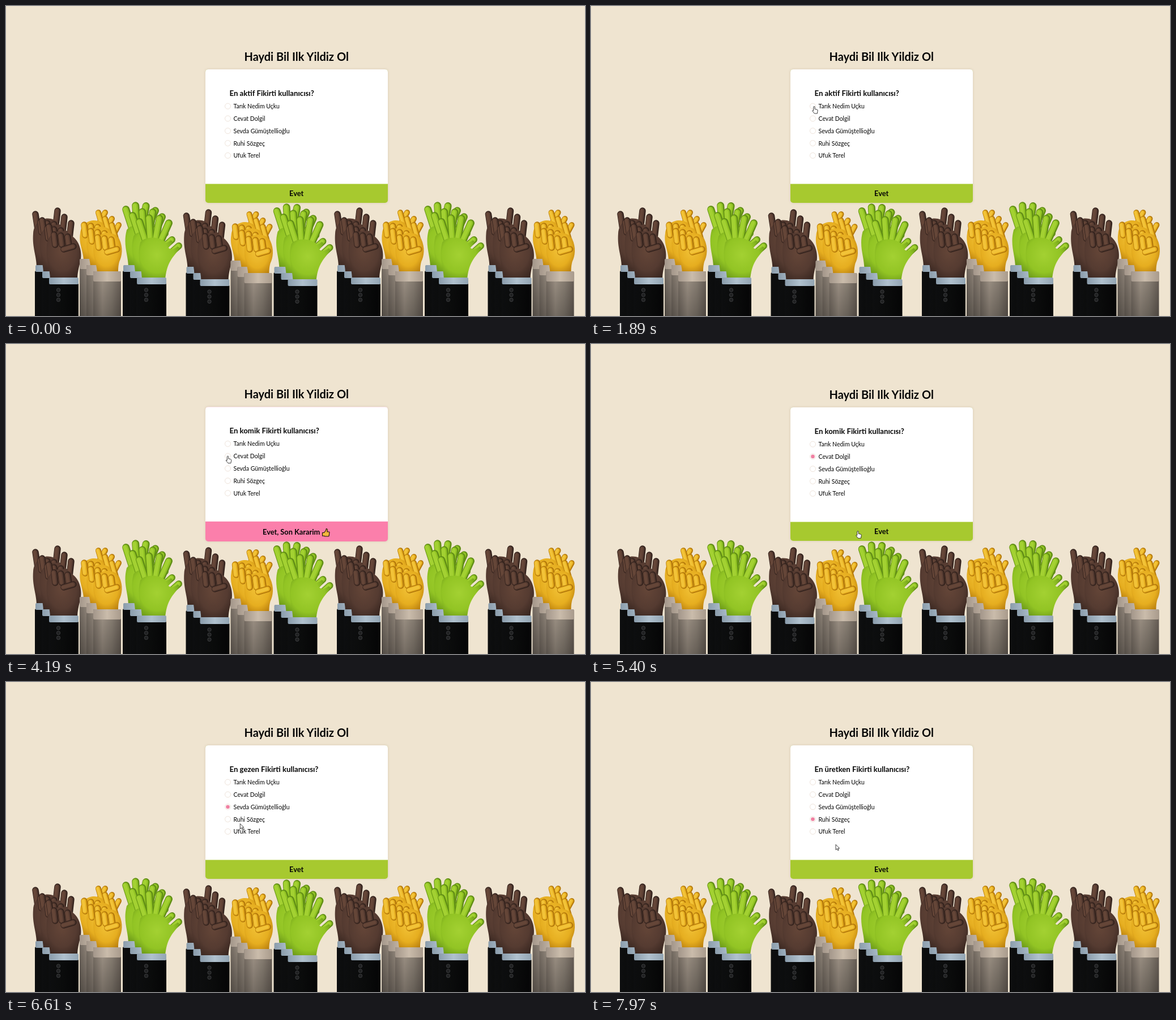
Recreate the animation shown at these times as an HTML page. Size 1022 by 548 pixels, loop 8 s.

```html
<!DOCTYPE html>
<html lang="tr">
<head>
<meta charset="utf-8">
<title>Quiz</title>
<style>
  html, body { margin: 0; width: 100%; height: 100%; overflow: hidden; background: #efe4d0; }
  svg { display: block; width: 100vw; height: 100vh; }
  text { font-family: Lato, "Open Sans", sans-serif; fill: #050505; }
  .title { font-size: 20px; font-weight: 700; text-anchor: middle; }
  .question { font-size: 13.2px; font-weight: 700; }
  .option { font-size: 10.5px; }
  .button { font-size: 12.8px; font-weight: 700; }
  #card { filter: drop-shadow(0 0 2px rgba(90, 70, 40, .16)); }
  .ring { fill: #fff; stroke: #eee3da; }
  .dot { fill: #f080a2; }
</style>
</head>
<body>
<svg viewBox="0 0 1022 548" preserveAspectRatio="none">
  <defs id="defs"></defs>
  <g id="crowd" fill="none"></g>
  <g id="panel">
    <text class="title" x="512.7" y="97">Haydi Bil Ilk Yildiz Ol</text>
    <rect id="card" x="352" y="112" width="322" rx="5"></rect>
    <path fill="#fff" d="M352 314.500V117q0-5 5-5h312q5 0 5 5V314.500z"></path>
    <text id="question" class="question" x="394.5" y="159"></text>
    <g id="options"></g>
  </g>
  <text id="plain" class="button" x="512.7" y="335.5" text-anchor="middle">Evet</text>
  <g id="final">
    <text class="button" x="453" y="336.500">Evet, Son Kararim</text>
    <path d="M558.500 333.500h3l3.200-4 .5-3q2.600 0 2 4l-.4 1.500h3.200q1.600.6.8 2l-.6 5q-.3 1-1.400 1h-6l-1.300-.8h-3z"
          fill="#f4b73d" stroke="#15100a" stroke-width="1.100" stroke-linejoin="round"></path>
  </g>
  <g id="cursor" fill="#fff" stroke="#111" stroke-width=".8" stroke-linejoin="round">
    <path id="arrow" d="M0 0V9.300L2.200 7.300 3.700 10.500 5.200 9.800 3.800 6.700H6.600Z"></path>
    <path id="hand" d="M-1.200 1a1.200 1.200 0 0 1 2.400 0V4.400l3.800.9q1.500.5 1.200 2L5.400 12.300H.4L-3.200 7.700q0-1.700 2-.4z"></path>
  </g>
</svg>
<script>
const LOOP = 8000;
const $ = id => document.getElementById(id);
const times = (n, make) => Array.from({ length: n }, (_, i) => make(i)).join('');

// Each skin: shadow, base, highlight
const skins = {
  brown:  ['#35241e', '#553b31', '#654638'],
  yellow: ['#b3780b', '#e6ae20', '#f2c338'],
  green:  ['#628f16', '#92c424', '#a3d132']
};
const ramp = (id, colors, axis = 'x2="1"') =>
  `<linearGradient id="${id}" x1="0" y1="0" ${axis}>` +
  colors.map((c, i) => `<stop offset="${i / (colors.length - 1)}" stop-color="${c}"/>`).join('') +
  '</linearGradient>';
$('defs').innerHTML =
  Object.entries(skins).map(([name, [dark, base, light]]) =>
    `<radialGradient id="${name}" cx=".45" cy=".4" r=".7">
       <stop offset="0" stop-color="${light}"/><stop offset=".6" stop-color="${base}"/>
       <stop offset="1" stop-color="${dark}"/></radialGradient>`).join('') +
  ramp('suit', ['#0d0e0f', '#0a0b0b', '#050506']) +
  ramp('wool', ['#71685f', '#978c80', '#837a6f', '#645b53']) +
  ramp('cuff', ['#8a9cab', '#b0c1ce', '#93a5b3']) +
  ramp('hem', ['#a3968a', '#cabcab', '#a99b8c']) +
  ramp('dusk', ['#0000', '#0005'], 'x2="0" y2="1"');

const rect = (x, y, w, h, fill) =>
  `<rect x="${x}" y="${y}" width="${w}" height="${h}" rx="2" fill="${fill}"/>`;
const palm = (skin, d) => `<path d="${d}" fill="url(#${skin})"/>`;

// Rounded finger from its tip to its root, lit from the left
const finger = (skin, x1, y1, x2, y2, w = 11.5) => skins[skin].map((color, i) =>
  `<path d="M${x1 - i * w * .07} ${y1}L${x2 - i * w * .07} ${y2}" stroke="${color}"
    stroke-width="${w * (1 - i * .26)}" stroke-linecap="round"/>`).join('');

// Curled fingers side by side, with the thumb across them
const fist = (skin, x, y, n) =>
  times(n, i => finger(skin, x + i * 12, y + 2 * i, x + 2 + i * 12, y + 18)) +
  finger(skin, x + 34, y + 21, x + 17, y + 26);

const suitArm = x =>
  rect(x, 490, 53, 90, 'url(#suit)') + rect(x + 1, 480, 52, 12, 'url(#cuff)') +
  times(3, i => `<circle cx="${x + 17.500}" cy="${502 + i * 8.700}" r="3.200" fill="#202122" stroke="#3b3c3e"/>`);
const woolArm = x =>
  rect(x, 469, 49, 105, 'url(#wool)') + rect(x, 469, 49, 18, 'url(#hem)') + rect(x, 487, 49, 90, 'url(#dusk)');

const brownArm =
  finger('brown', 76, 390, 82, 430) + finger('brown', 115, 384, 110, 428) +
  palm('brown', 'M72 424C74 396 104 390 117 407C130 416 134 434 132 448C128 465 126 471 126 484H78C78 463 70 450 72 424Z') +
  fist('brown', 85, 404, 3) + suitArm(75);

const yellowArm =
  finger('yellow', 199, 387, 182, 418, 10) + finger('yellow', 187, 387, 196, 418, 10) +
  palm('yellow', 'M155 424C157 398 190 394 200 412C207 427 205 442 200 452C198 460 198 464 198 473H161C161 455 152 443 155 424Z') +
  fist('yellow', 162, 409, 3) + woolArm(154);

const greenArm =
  times(4, i => {
    const a = (-18 + 14 * i) * Math.PI / 180, reach = 72 + 4 * Math.sin(i);
    return finger('green', 258 + reach * Math.sin(a), 450 - reach * Math.cos(a),
      258 + 30 * Math.sin(a), 450 - 30 * Math.cos(a), 13);
  }) +
  finger('green', 305, 424, 278, 448, 12) +
  palm('green', 'M237 418C244 407 270 407 281 417C285 431 293 433 303 425Q308 427 303 433C294 445 283 455 281 485H240C240 462 230 445 237 418Z') +
  suitArm(230);

// Every arm stands in a row of three, rear to front
const trio = arm => times(3, i => `<g transform="translate(${12 * (i - 2)} ${11 * (i - 2)})">${arm}</g>`);
const arms = [brownArm, yellowArm, greenArm].map(trio);
$('crowd').innerHTML = times(4, i =>
  `<g transform="translate(${i * 266.500} ${i === 1 ? 3 : 0})">${arms.slice(0, i < 3 ? 3 : 2).join('')}</g>`);

const rowY = i => 177.500 + i * 21.800;
const names = ['Tarık Nedim Uçku', 'Cevat Dolgil', 'Sevda Gümüştellioğlu', 'Ruhi Sözgeç', 'Ufuk Terel'];
$('options').innerHTML = names.map((name, i) =>
  `<circle class="ring" cx="391.500" cy="${rowY(i) - .4}" r="5"/>
   <circle class="dot" cx="391.500" cy="${rowY(i) - .4}" r="3.300"/>
   <text class="option" x="401.500" y="${rowY(i) + 3.700}">${name}</text>`).join('');
const dots = document.querySelectorAll('.dot');

// Round i picks option i, then presses the button, which asks the next question
const rounds = [
  { word: 'aktif', asked: 0, pick: 2550 },
  { word: 'komik', asked: 3580, pick: 4920 },
  { word: 'gezen', asked: 5670, pick: 6540 },
  { word: 'üretken', asked: 7290, pick: 7950 }
];
rounds.forEach((r, i) => r.end = rounds[i + 1]?.asked ?? 8290);

const ENTER = 260;
const moves = [{ from: ENTER, to: 1060, x: 574, y: 270 }];
rounds.forEach((r, i) => {
  const from = i ? r.asked : 1060;
  moves.push({ from, to: i ? from + 620 : 2000, x: 391.500, y: rowY(i) - 1 });
  moves.push({ from: r.pick, to: r.end - 270, x: 471, y: 331 });
});

const easeOut = k => 1 - (1 - k) ** 2;
function pointerAt(t) {
  let x = 859, y = 522;
  for (const m of moves) {
    const k = easeOut(Math.min(1, Math.max(0, (t - m.from) / (m.to - m.from))));
    x += (m.x - x) * k;
    y += (m.y - y) * k;
  }
  return [x, y];
}

const show = (el, on) => el.setAttribute('visibility', on ? 'visible' : 'hidden');

function draw(t) {
  const now = rounds.findLastIndex(r => r.asked <= t);
  const round = rounds[now];
  // The button stays pink from the press until the next option is pressed
  const pink = t >= round.end - 140 || (now > 0 && t < round.pick - 70);
  $('panel').setAttribute('transform', `translate(0 ${pink ? -.7 : 0})`);
  $('card').setAttribute('height', pink ? 237.700 : 236);
  $('card').setAttribute('fill', pink ? '#fb7fab' : '#a7c92f');
  show($('plain'), !pink);
  show($('final'), pink);

  $('question').textContent = `En ${round.word} Fikirti kullanıcısı?`;
  dots.forEach((dot, i) => show(dot, i === now && t >= round.pick));

  const [x, y] = pointerAt(t);
  const onButton = x > 352 && x < 674 && y > 314.500 && y < 349;
  const onOption = x > 385 && x < 450 && names.some((_, i) => Math.abs(rowY(i) - y) < 5);
  const pointing = onButton || onOption;
  $('cursor').setAttribute('transform', `translate(${x} ${y})`);
  show($('hand'), t >= ENTER && pointing);
  show($('arrow'), t >= ENTER && !pointing);
}

const start = performance.now();
function tick() {
  draw((performance.now() - start) % LOOP);
  requestAnimationFrame(tick);
}
tick();
</script>
</body>
</html>
```
